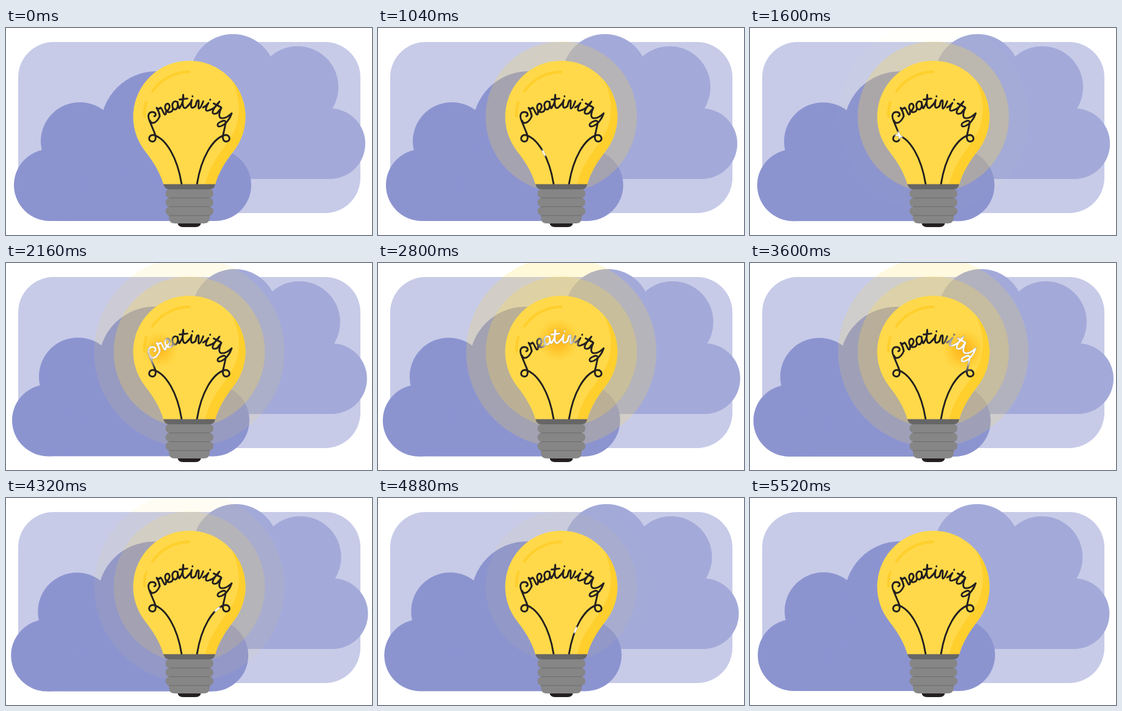
These frames come from a looping animation (600x340 px, 5600 ms). An HTML page:

```html
<!DOCTYPE html>
<html lang="en">
<head>
<meta charset="utf-8">
<title>Creativity bulb</title>
<style>
  html, body { margin: 0; height: 100%; overflow: hidden; background: #fff; }
  svg { display: block; width: 600px; height: 340px; }
</style>
</head>
<body>
<svg viewBox="0 0 600 340" role="img" aria-label="creativity">
  <defs>
    <path id="bulb" d="M258 257C254 241 243 221 228.500 203A92 92 0 1 1 372.500 203C358 221 347 241 343 257Z"/>
    <clipPath id="inBulb"><use href="#bulb"/></clipPath>
    <radialGradient id="soft">
      <stop offset=".5" stop-color="#fff"/>
      <stop offset="1" stop-color="#fff" stop-opacity="0"/>
    </radialGradient>
    <radialGradient id="heat">
      <stop offset="0" stop-color="#ffb319"/>
      <stop offset=".4" stop-color="#ffb81c" stop-opacity=".75"/>
      <stop offset="1" stop-color="#ffc41f" stop-opacity="0"/>
    </radialGradient>
    <mask id="lit" maskUnits="userSpaceOnUse" x="0" y="0" width="600" height="340">
      <circle id="spark" fill="url(#soft)"/>
    </mask>
    <path id="guide" d="M288 257C281 212 262 182 243 176L238 156A80 80 0 0 1 363 156L358 176C339 182 320 212 313 257"/>
    <g id="wire" fill="none" stroke-width="2.900" stroke-linecap="round" stroke-linejoin="round">
      <!-- left lead into "c" -->
      <path d="M288 257C281 212 262 182 243 176C233 174 232 186.500 240 186.500C247 186.500 246 177 243 171L236 154
        C231 144 234 138 240 138C246 138 247 144 243 145M236 152C238 158 246 158 252 145"/>
      <!-- "y" into right lead -->
      <path d="M346 140C348 137 351 134 353 131C349 139 348 147 353 148C359 149 365 145 370 140
        C367 150 360 158 353 161C345 164 345 157 352 154C358 151 361 152 360 157L357 171
        C355 177 354 186.500 361 186.500C369 186.500 368 174 358 176C339 182 320 212 313 257"/>
    </g>
  </defs>

  <rect x="20" y="23" width="561" height="281" rx="58" fill="#c7cbe8"/>
  <g id="rightCloud" fill="#a3aad9">
    <rect x="340" y="110" width="191" height="138"/>
    <circle cx="372" cy="80" r="70"/>
    <circle cx="478" cy="97" r="67"/>
    <circle cx="531" cy="190" r="58"/>
  </g>
  <g id="leftCloud" fill="#8c94d0">
    <rect x="72" y="199" width="271" height="118"/>
    <circle cx="72" cy="258" r="59"/>
    <circle cx="121" cy="186" r="64"/>
    <circle cx="247" cy="163" r="92"/>
    <circle cx="343" cy="258" r="59"/>
  </g>

  <g fill="#ffd83f">
    <circle id="outer" cx="300.500" cy="146" r="156"/>
    <circle id="inner" cx="300.500" cy="146" r="124"/>
  </g>

  <use href="#bulb" fill="#ffd94a"/>
  <path clip-path="url(#inBulb)" fill="#ffcf2d" d="M361 70C384 102 390 148 368 180C354 203 333 224 327 257H400V70Z"/>
  <path fill="none" stroke="#ffcf2d" stroke-width="4.500" stroke-linecap="round"
    d="M240 104A74 74 0 0 1 300 72M230 122Q226 133 227 145"/>
  <circle id="glow" fill="url(#heat)" clip-path="url(#inBulb)"/>
  <use href="#wire" stroke="#231f20"/>
  <g mask="url(#lit)"><use href="#wire" stroke="#fff"/></g>

  <path fill="#231f20" d="M281 319H320Q319 327 311 327H290Q282 327 281 319Z"/>
  <g id="ribs" fill="#868686">
    <path d="M267 306H334V311Q334 321 324 321H277Q267 321 267 311Z"/>
  </g>
  <path stroke="#6b6b6b" d="M267 279H334M267 293.500H334M267 308H334"/>
  <path fill="#666" d="M258 256.500H343Q342 265 333 265H268Q260 265 258 256.500Z"/>
</svg>

<script>
const LOOP = 5600;
const el = id => document.getElementById(id);
const set = (node, attrs) => {
  for (const name in attrs) node.setAttribute(name, attrs[name]);
  return node;
};
const add = (parent, tag, attrs) =>
  parent.appendChild(set(document.createElementNS("http://www.w3.org/2000/svg", tag), attrs));

for (let i = 0; i < 3; i++)
  add(el("ribs"), "rect", { x: 261.5, y: 264.5 + i * 14.5, width: 78.5, height: 14.5, rx: 7 });

// Wire letters, baseline at y = 0, joined at (-6,-3) and (6,-3).
const glyphs = {
  r: "M-6-3C-4-7-3-12-3-17C-2-13 0-13 2-14C5-14 0 0 3 0Q5 0 6-3",
  e: "M-6-3C-1-4 5-8 3-13C1-17-6-13-5-6C-4 2 4 1 6-3",
  a: "M4-11C1-17-6-13-6-6C-6 2 3 1 4-12C3-3 3 2 6-3",
  t: "M-6-3C-2-8 1-16 1-22C-2-12-3 0 1 0Q4 0 6-3M-6-15H7",
  i: "M-6-3C-4-5-1-9 0-13C-2-5-1 0 1 0Q4 0 6-3M1-19v.5",
  v: "M-6-3C-6-10-5-14-3-13C-1-11-2 0 0 0C3 0 4-9 5-13"
};
[..."reativit"].forEach((letter, i) => add(el("wire"), "path", {
  d: glyphs[letter],
  transform: `translate(302 211) rotate(${-32.8 + i * 8.6}) translate(0 -80)`
}));

const clamp = x => Math.max(0, Math.min(1, x));
const smooth = x => x * x * (3 - 2 * x);
const ramp = (t, from, to) => smooth(clamp((t - from) / (to - from)));
// Rises during a..b, falls during c..d.
const pulse = (t, a, b, c, d) => ramp(t, a, b) * (1 - ramp(t, c, d));

const guide = el("guide");
const guideLength = guide.getTotalLength();

function draw(now) {
  const t = now % LOOP;
  const drift = 7.6 * clamp(Math.min((t - 1240) / 2320, (LOOP - t) / 2040));
  set(el("leftCloud"), { transform: `translate(${-drift} ${drift * .13})` });
  set(el("rightCloud"), { transform: `translate(${drift * .93} 0)` });

  set(el("inner"), { opacity: .26 * pulse(t, 300, 1300, 3400, 5500) });
  set(el("outer"), { opacity: .2 * pulse(t, 1400, 2900, 3100, 5000) });

  const travel = clamp((t - 300) / 5150);
  const { x: cx, y: cy } = guide.getPointAtLength(travel * guideLength);
  const heat = pulse(t, 1500, 2400, 3600, 4350);
  const r = travel > 0 && travel < 1 ? 7 + 30 * heat : 0;
  set(el("spark"), { cx, cy, r });
  set(el("glow"), { cx, cy, r: r * .95, opacity: heat });
  requestAnimationFrame(() => draw(performance.now()));
}
draw(0);
</script>
</body>
</html>
```
